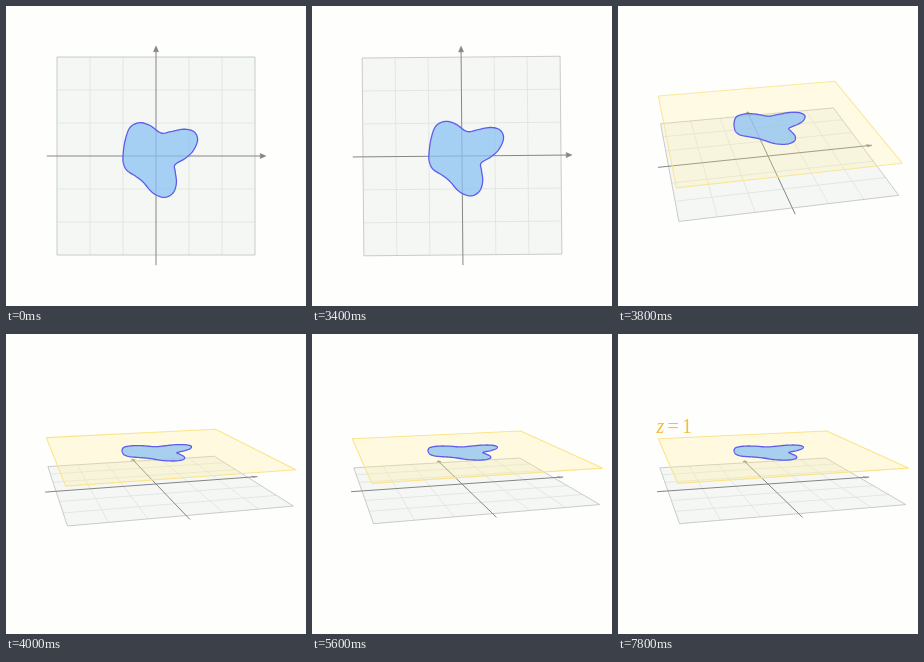
Recreate the animation shown at these times as an HTML page with a canvas. Size 300 by 300 pixels, loop 8000 ms.

```html
<!DOCTYPE html>
<html lang="en">
<head>
<meta charset="utf-8">
<title>Plane at z = 1</title>
<style>
  html, body { margin: 0; width: 100%; height: 100%; overflow: hidden; background: #fefefd; }
  canvas { display: block; width: 100vw; height: 100vh; }
</style>
</head>
<body>
<canvas id="stage"></canvas>
<script>
const SIZE = 300, CENTER = 150, UNIT = 33;
const LOOP = 8000, STEP = 200;
const TILT = 75 * Math.PI / 180, TURN = 15 * Math.PI / 180, PERSPECTIVE = 1 / 17;

const canvas = document.getElementById('stage');
const ctx = canvas.getContext('2d');

// Outline of the blob in flat stage coordinates
const outline = [
  [117, 150], [119, 135], [124, 121.5], [133.5, 116.7], [144, 119.5], [155, 127], [165, 125.6],
  [178, 123.2], [188, 125.7], [191.6, 134], [187, 145], [179, 152.5], [169, 158.8], [169.3, 166],
  [170.4, 177], [167, 187], [158, 191.4], [147, 187], [137, 176], [130, 170.5], [121, 164.5], [117.5, 157.5]
].map(([x, y]) => [(x - CENTER) / UNIT, (CENTER - y) / UNIT]);

const spline = (a, b, c, d, t) =>
  b + 0.5 * t * (c - a + t * (2 * a - 5 * b + 4 * c - d + t * (3 * (b - c) + d - a)));

const blob = outline.flatMap((_, i) => {
  const [a, b, c, d] = [-1, 0, 1, 2].map(k => outline.at((i + k) % outline.length));
  return Array.from({ length: 8 }, (_, k) => [0, 1].map(j => spline(a[j], b[j], c[j], d[j], k / 8)));
});

const square = [[-3, 3], [3, 3], [3, -3], [-3, -3]];

const clamp = x => Math.min(1, Math.max(0, x));
const sigmoid = x => 1 / (1 + Math.exp(-x));
const smooth = t => {
  const edge = sigmoid(-5);
  return clamp((sigmoid(10 * (clamp(t) - 0.5)) - edge) / (1 - 2 * edge));
};

// Orthographic top view at u = 0, tilted perspective view at u = 1
function camera(u) {
  const phi = TILT * u, theta = TURN * u;
  return (x, y, z) => {
    const across = Math.cos(theta) * x - Math.sin(theta) * y;
    const along = Math.sin(theta) * x + Math.cos(theta) * y;
    const up = Math.cos(phi) * along + Math.sin(phi) * z;
    const depth = Math.sin(phi) * along - Math.cos(phi) * z;
    const scale = UNIT / (1 + depth * PERSPECTIVE * u);
    return [CENTER + across * scale, CENTER - up * scale];
  };
}

function shape(project, points, z, { fill, stroke, width = 1, open = false }) {
  ctx.beginPath();
  for (const [x, y] of points) ctx.lineTo(...project(x, y, z));
  if (!open) ctx.closePath();
  if (fill) { ctx.fillStyle = fill; ctx.fill(); }
  if (stroke) { ctx.strokeStyle = stroke; ctx.lineWidth = width; ctx.stroke(); }
}

function drawGrid(project) {
  shape(project, square, 0, { fill: '#f5f7f5' });
  const line = { stroke: '#dfe2dd', width: 0.8, open: true };
  for (const k of [-2, -1, 1, 2]) {
    shape(project, [[k, -3], [k, 3]], 0, line);
    shape(project, [[-3, k], [3, k]], 0, line);
  }
  shape(project, square, 0, { stroke: '#c3c7c3', width: 0.9 });
}

function drawAxes(project) {
  const color = '#858585', end = 3.33, neck = end - 0.17, half = 0.075;
  const swap = points => points.map(([x, y]) => [y, x]);
  const shaft = [[-3.31, 0], [neck, 0]];
  const head = [[end, 0], [neck, half], [neck, -half]];
  for (const turn of [p => p, swap]) {
    shape(project, turn(shaft), 0, { stroke: color, width: 1, open: true });
    shape(project, turn(head), 0, { fill: color, stroke: color, width: 0.6 });
  }
}

function drawLabel(t) {
  const glyphs = [['z', 38.5, 'italic '], ['=', 49.5, ''], ['1', 64, '']];
  ctx.fillStyle = '#f5bd35';
  glyphs.forEach(([char, x, style], i) => {
    ctx.globalAlpha = smooth((t - 6300 - i * 120) / 400);
    ctx.font = style + '20px "Liberation Serif", serif';
    ctx.fillText(char, x, 99);
  });
  ctx.globalAlpha = 1;
}

function draw(t) {
  const u = smooth((t - 3245) / 850);
  const project = camera(u);
  ctx.fillStyle = '#fefefd';
  ctx.fillRect(0, 0, SIZE, SIZE);
  drawGrid(project);
  drawAxes(project);
  ctx.globalAlpha = u;
  shape(project, square, 1, { fill: 'rgba(255, 236, 140, 0.27)', stroke: '#fbe48c', width: 1.1 });
  ctx.globalAlpha = 1;
  shape(project, blob, 1, { fill: 'rgba(140, 194, 244, 0.74)', stroke: '#5f5cec', width: 1.3 });
  drawLabel(t);
}

function frame(now) {
  const ratio = window.devicePixelRatio || 1;
  const w = Math.round(innerWidth * ratio), h = Math.round(innerHeight * ratio);
  if (canvas.width !== w || canvas.height !== h) { canvas.width = w; canvas.height = h; }
  ctx.setTransform(w / SIZE, 0, 0, h / SIZE, 0, 0);
  ctx.lineJoin = 'round';
  draw(Math.floor(now % LOOP / STEP) * STEP);
  requestAnimationFrame(frame);
}
requestAnimationFrame(frame);
</script>
</body>
</html>
```
